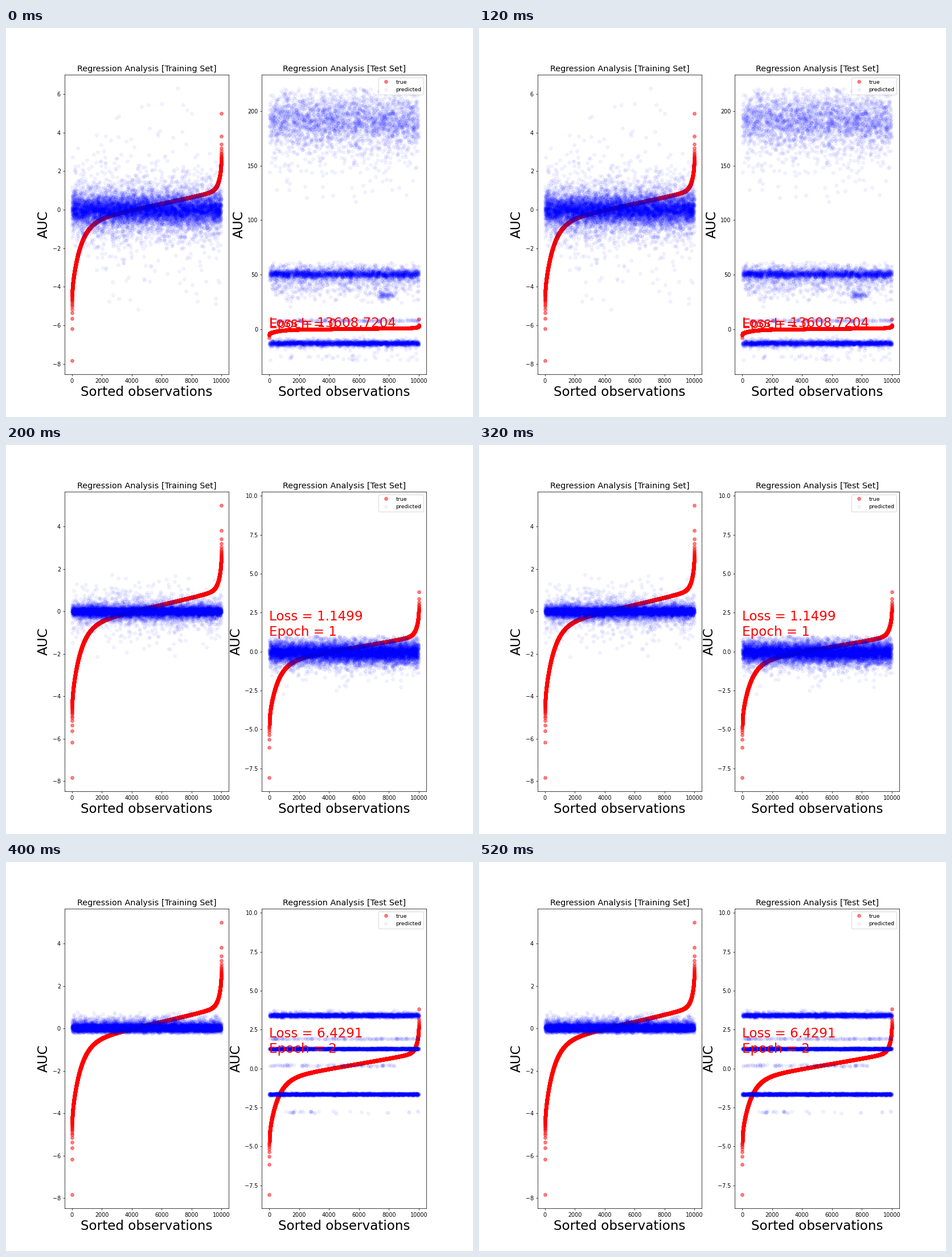
Recreate the animation shown at these times as a matplotlib script. Size 820 by 683 pixels, loop 600 ms.

```python
import numpy as np
import matplotlib.pyplot as plt
from matplotlib.animation import FuncAnimation

N = 10000
DPI = 68.3334
BIG, MID, SMALL = 24.3, 15.2, 10.2
rng = np.random.default_rng(7)


def sorted_targets(low, high):
    """Sorted observations: a straight middle with steep tails."""
    p = (np.arange(N) + .5) / N
    q = 1 - p
    left = 3.2 * np.exp(-16.5 * p) + .029 / np.sqrt(p)
    right = 1.1 * np.exp(-50 * q) + .022 / np.sqrt(q)
    y = 1.6 * (p - .4) - left + right
    y[0], y[-1] = low, high
    return y


def band(n, mid, scale, lo, hi, df=30, x0=0, x1=N):
    """Horizontal cloud with Student-t spread, cut to [lo, hi]."""
    y = mid + scale * rng.standard_t(df, n)
    y = y[(y > lo) & (y < hi)]
    return rng.uniform(x0, x1, len(y)), y


def join(*bands):
    return np.concatenate(bands, axis=1)


def limits(lo, hi):
    pad = .05 * (hi - lo)
    return lo - pad, hi + pad


train_true = sorted_targets(-7.83, 5.0)
test_true = sorted_targets(-8.1, 9.4)

train_pred = [
    band(N, 0, .38, -5.5, 6.3, df=2.7),
    band(N, 0, .11, -2.6, 1.85, df=2),
    join(band(8000, .02, .1, -.23, .4),
         band(2000, .15, .2, -.2, .8)),
]

test_pred = [
    join(band(3100, 191, 12, 116, 221, df=3),
         band(3300, 50.5, 2, 20, 61.5, df=2),
         band(300, 38, 6, 24, 47),
         band(80, 31, 2, 25, 37, x0=7300, x1=8250),
         band(230, 7.8, .7, 5, 10),
         band(2800, -13, 1, -20, -6, df=4),
         band(45, -25.5, 2, -29, -21)),
    band(N, -.05, .33, -2.75, 1.02, df=5),
    join(band(3300, 3.42, .06, 3.25, 3.75, df=4),
         band(190, 1.92, .03, 1.8, 2.05),
         band(3100, 1.27, .025, 1.15, 1.4),
         band(120, .2, .04, .05, .35, x1=8400),
         band(3200, -1.65, .035, -1.8, -1.5),
         band(24, -2.8, .04, -3, -2.6, x0=950, x1=3400),
         band(12, -2.8, .07, -3, -2.6, x0=4000)),
]

train_lim = [limits(-7.83, 6.3)] + 2 * [limits(-7.83, 5.0)]
test_lim = [limits(-29, 221)] + 2 * [limits(-8.1, 9.4)]
losses = [13608.7204, 1.1499, 6.4291]

fig, axes = plt.subplots(1, 2, figsize=(12, 9.9952), dpi=DPI)
clouds = []
for ax, name, true in zip(axes, ("Training", "Test"), (train_true, test_true)):
    ax.plot(np.arange(N), true, "o", color="red", alpha=.5, label="true")
    clouds += ax.plot([], [], "o", color="blue", alpha=.05, label="predicted")
    ax.set_title(f"Regression Analysis [{name} Set]", fontsize=MID)
    ax.set_xlabel("Sorted observations", fontsize=BIG)
    ax.set_ylabel("AUC", fontsize=BIG)
    ax.tick_params(labelsize=SMALL)
    ax.set_xlim(limits(0, N))
axes[1].legend(loc="upper right")
loss_text, epoch_text = (
    axes[1].text(0, y, "", color="red", fontsize=BIG) for y in (2, 1))


def draw(epoch):
    for cloud, pred in zip(clouds, (train_pred, test_pred)):
        cloud.set_data(*pred[epoch])
    for ax, lim in zip(axes, (train_lim, test_lim)):
        ax.set_ylim(lim[epoch])
    loss_text.set_text(f"Loss = {losses[epoch]:.4f}")
    epoch_text.set_text(f"Epoch = {epoch}")
    return *clouds, loss_text, epoch_text


anim = FuncAnimation(fig, draw, frames=3, interval=200, repeat=True)
plt.show()
```
